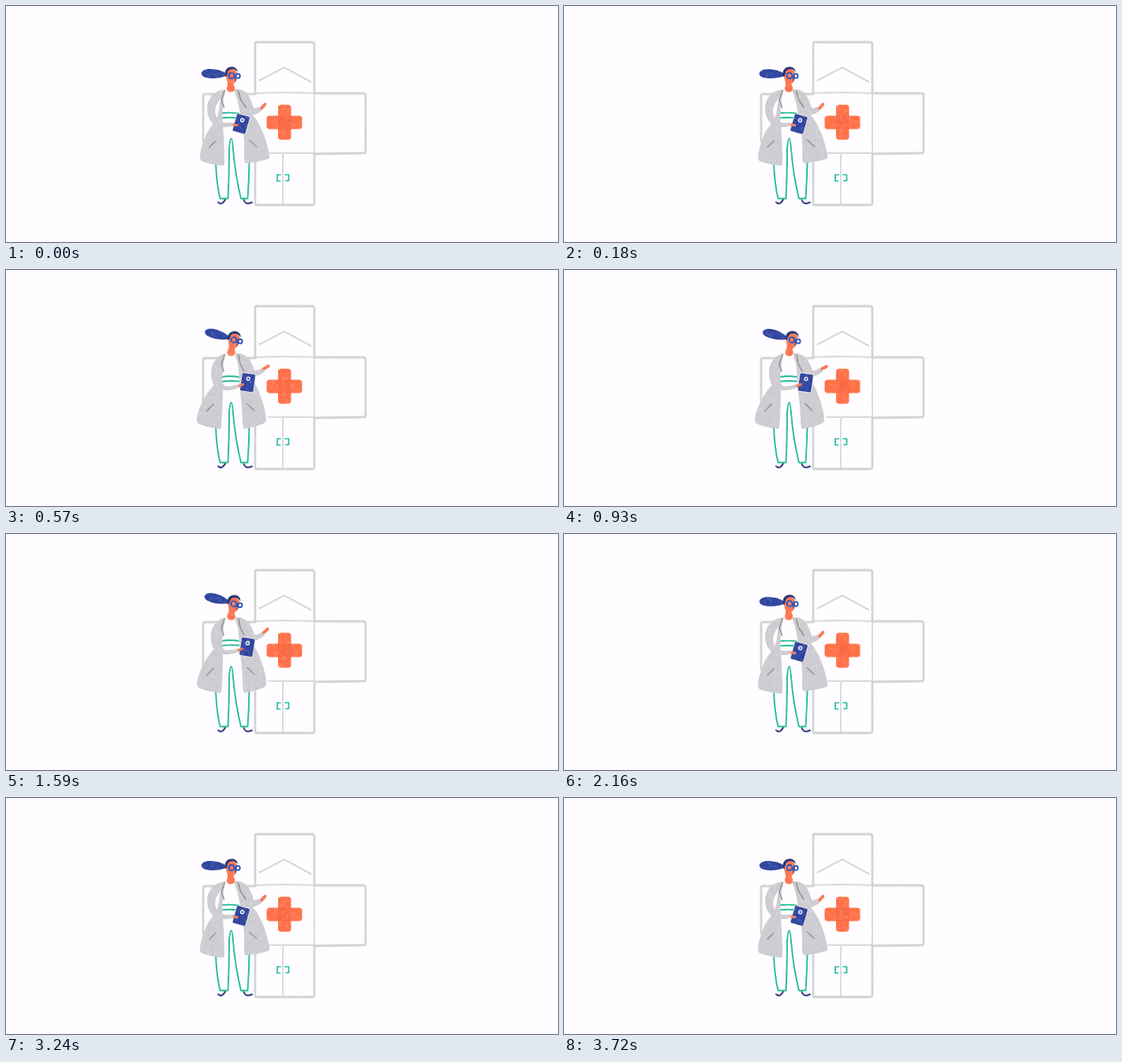
An HTML page for the animation above (3.75 s loop, 700 by 300 pixels).

```html
<!DOCTYPE html>
<html lang="en">
<head>
<meta charset="utf-8">
<title>Doctor at the clinic</title>
<style>
html, body { margin: 0; width: 100%; height: 100%; overflow: hidden; background: #fffdff; }
svg { display: block; width: 700px; height: 300px; }
path, circle { stroke-linecap: round; stroke-linejoin: round; }
.wall { fill: none; stroke: #d2d1d4; stroke-width: 2.8; }
.thin { fill: none; stroke: #d9d8db; stroke-width: 1.9; }
.green { fill: none; stroke: #1fba98; stroke-width: 1.9; }
.coat { fill: #cdccd0; }
.seam { fill: none; stroke: #8f8e94; stroke-width: 1.5; }
.skin { fill: #fb7653; }
.hand { fill: none; stroke: #fb7653; stroke-width: 3.9; }
.navy { fill: #2f459f; }
.shoe { fill: none; stroke: #2a3a7c; stroke-width: 2; }
.specs { fill: none; stroke: #2850bd; stroke-width: 1.9; }
</style>
</head>
<body>
<svg viewBox="0 0 700 300" xmlns="http://www.w3.org/2000/svg">
  <defs>
    <filter id="chalk" filterUnits="userSpaceOnUse" x="230" y="30" width="240" height="235" color-interpolation-filters="sRGB">
      <feTurbulence class="boil" type="fractalNoise" baseFrequency=".1" numOctaves="2"/>
      <feColorMatrix values="1 0 0 0 0  0 1 0 0 0  0 0 1 0 0  0 0 0 0 1" result="wave"/>
      <feDisplacementMap in="SourceGraphic" in2="wave" scale="1.2" xChannelSelector="R" yChannelSelector="G" result="rough"/>
      <feTurbulence class="boil" type="fractalNoise" baseFrequency=".2" numOctaves="2"/>
      <feColorMatrix values="0 0 0 0 1  0 0 0 0 1  0 0 0 0 1  .4 0 0 0 -.18"/>
      <feComposite in2="rough" operator="in" result="grain"/>
      <feMerge><feMergeNode in="rough"/><feMergeNode in="grain"/></feMerge>
    </filter>
  </defs>

  <g filter="url(#chalk)">
    <path class="thin" d="M316 111 Q353 109 391 111 V187 M333 187 H391 M351 188 V252"/>
    <path class="wall" d="M316 110 V48 Q316 46 318 46 H388 Q391 46 391 49 V110 M316 112 H252 Q250 112 250 115 V172 M391 111 H453 Q456 111 456 114 V185 Q456 187 454 187 L391 188 V250 Q391 253 388 253 H318 Q316 253 316 251 V187"/>
    <path class="thin" style="stroke:#cfced2" d="M321.500 94.500 L353 78 L386.500 96.500"/>
    <path class="green" style="stroke-width:1.7" d="M348 214.500 H344 V222.500 H347.500 M354 214.500 H358.500 V222 H355"/>
    <g fill="#ff7148">
      <rect x="345" y="125.500" width="16.500" height="44.500" rx="4"/>
      <rect x="330.500" y="139.500" width="45" height="17" rx="4"/>
      <rect x="345" y="139.500" width="16.500" height="17" fill="#f96a42"/>
    </g>
  </g>

  <g filter="url(#chalk)">
    <path class="shoe" d="M269 249.500 Q274 254 278 246 M301.500 246.500 Q304 253.500 312 249.500"/>
    <path fill="#fffdff" d="M278 107 H290 L300 148 L304 198 H274 V148Z"/>
    <path class="green" d="M266 200 Q267 226 271.500 244.800 H281.500 Q283 215 283 182 Q284 168.500 285.500 168.500 Q287 168.500 288 182 Q291 217 298 244.800 H306.500 Q308 222 308.500 199"/>
    <path id="belt" class="green"/>
    <path id="left" class="coat"/>
    <path id="right" class="coat"/>
    <path id="reach" class="coat"/>
    <path id="point" class="hand"/>
    <path id="arm" class="coat"/>
    <path id="seams" class="seam"/>
    <g id="book">
      <rect class="navy" x="-8.300" y="-11.300" width="16.600" height="22.600" rx="1.500" stroke="#f3f1f5" stroke-width="1.600" paint-order="stroke"/>
      <circle cx="0" cy="-5" r="2" fill="#2f459f" stroke="#fff" stroke-width="1.400"/>
    </g>
    <path id="grip" class="hand" style="stroke-width:3.2"/>
    <g id="head">
      <path id="tail" class="navy" d="M281 86.500 C272 81 262 79 254 80.500 C246 82.500 246 88 252 90.500 C262 93.500 272 91.500 281 88.500Z"/>
      <path class="skin" d="M279 86 C279 78 292 78 293 86 V92 Q292 97 288.500 99 Q288.500 101 290 103 Q291 109.500 285 109.500 Q279 109 280 103.500 Q281.500 101 281 97 Q279 93 279 86Z"/>
      <path fill="#27346f" d="M277.800 89 C275 75 293 73.500 294 84 C290 79 284 79.500 281.500 83 L279.500 90Z"/>
      <circle class="specs" cx="286" cy="88.500" r="3.500"/>
      <circle class="specs" cx="294" cy="89" r="2.700"/>
      <path class="specs" style="stroke-width:1.3" d="M290 89 L291 94.500"/>
    </g>
  </g>
</svg>
<script>
const LOOP = 3750;
const el = id => document.getElementById(id);
const lerp = (a, b, p) => a + (b - a) * p;

// Each part: rest pose, leaning pose
const poses = {
  belt: [
    "M275 136 Q284 135 295 136.500 M275 142.300 Q284 141.300 293 142.300",
    "M274 136 Q284 134 295 136 M274 141.800 Q284 140.500 295 141.500"],
  left: [
    "M279 106 C273 112 271 122 270 132 C269 145 260 151 254 163 C249 175 246 186 246 193 Q246 197 250 198 Q262 202 275 203 Q277 203 277 200 Q277 178 275 152 C274 140 274 128 278 108Z",
    "M279 106 C273 112 271 122 270 132 C268 145 257 151 250 166 C245 176 242 185 242 190 Q242 195 246 196 Q258 201 271 202 Q273 202 273 199 Q275 178 275 152 C274 140 274 128 278 108Z"],
  right: [
    "M289 106 Q293 105 299 107 C304 114 309 126 312 138 C322 148 331 170 334 190 Q335 194 331 195 Q318 199 304 200 Q302 199 302 190 Q303 165 298 148 C297 130 293 118 289 106Z",
    "M290 106 Q294 105 299 107 C305 113 309 126 312 138 C319 148 329 172 330 189 Q330 193 327 195 Q316 200 302 202 Q300 200 300 190 Q299 165 296 148 C296 130 295 118 290 106Z"],
  reach: [
    "M297 106.500 C307 108 311 119 314 129.500 Q318 130.500 322 127.500 L325.500 132 Q318 138.500 311 139 L303 130Z",
    "M297 106.500 C307 108 312 118 315 127.500 Q320 128.500 325 124 L328.500 128.500 Q320 135.500 312 136 L303 130Z"],
  arm: [
    "M279 106 C264 107 256 117 255 129 C255 145 264 154 276 154 C282 154 286 153 290 152 L289 148 C280 149 272 149 268 143 C263 135 265 126 272 118Z",
    "M279 106 C268 107 261 118 260 128 C259 145 267 153 279 153 C286 153 291 151 297 149 L296 145 C288 147 280 149 277 147 C272 143 271 130 273 118Z"],
  seams: [
    "M277 108 L273 119 L276.500 129 M294.500 108 L297.500 119 L304 128.500 M258 179.500 L266 171.500 M308.500 170.500 L317.500 178.500",
    "M277 108 L273 119 L276 129 M295 108 L297 119 L302 128.500 M254.500 179.500 L263 170.500 M306 170 L314.500 178.500"],
  grip: ["M289 151 L293 151.500", "M296 147.500 L300 145.500"]
};

const numbers = /-?\d+(\.\d+)?/g;
function mix(a, b, p) {
  const to = b.match(numbers);
  let i = 0;
  return a.replace(numbers, n => lerp(+n, +to[i++], p).toFixed(2));
}

function track(keys, t) {
  const i = keys.findIndex(k => k[0] > t);
  if (i < 0) return keys[keys.length - 1][1];
  const [t0, v0] = keys[i - 1], [t1, v1] = keys[i];
  const u = (t - t0) / (t1 - t0);
  return lerp(v0, v1, u * u * (3 - 2 * u));
}

const lean = [[0, 0], [370, -.05], [580, 1.04], [860, 1], [1480, 1], [1570, .96], [1790, -.04], [2040, 0]];
const dip = [[0, 0], [400, 0], [640, 1], [1000, 1], [1500, 0]];
const boil = document.querySelectorAll(".boil");
let lastSeed = -1;

function draw(t) {
  const p = track(lean, t), d = track(dip, t);
  for (const id in poses) el(id).setAttribute("d", mix(...poses[id], p));

  const x = lerp(324.3, 327.3, p), y = lerp(129.6, 124.8, p);
  const turn = lerp(-.85, -.74, p) + d * .26;
  el("point").setAttribute("d", `M${x} ${y + d * .8} l${6.2 * Math.cos(turn)} ${6.2 * Math.sin(turn)}`);

  el("book").setAttribute("transform", `translate(${lerp(298.2, 306.3, p)} ${lerp(149.8, 143.3, p)}) rotate(${lerp(16, 8, p)})`);
  el("head").setAttribute("transform", `rotate(${9 * p} 285 108)`);
  el("tail").setAttribute("transform", `rotate(${3 * p} 281 87)`);

  const seed = 1 + Math.floor(t / 90) % 14;
  if (seed !== lastSeed) {
    boil.forEach((n, i) => n.setAttribute("seed", seed + i * 20));
    lastSeed = seed;
  }
}

function tick() {
  draw(performance.now() % LOOP);
  requestAnimationFrame(tick);
}
tick();
</script>
</body>
</html>
```
